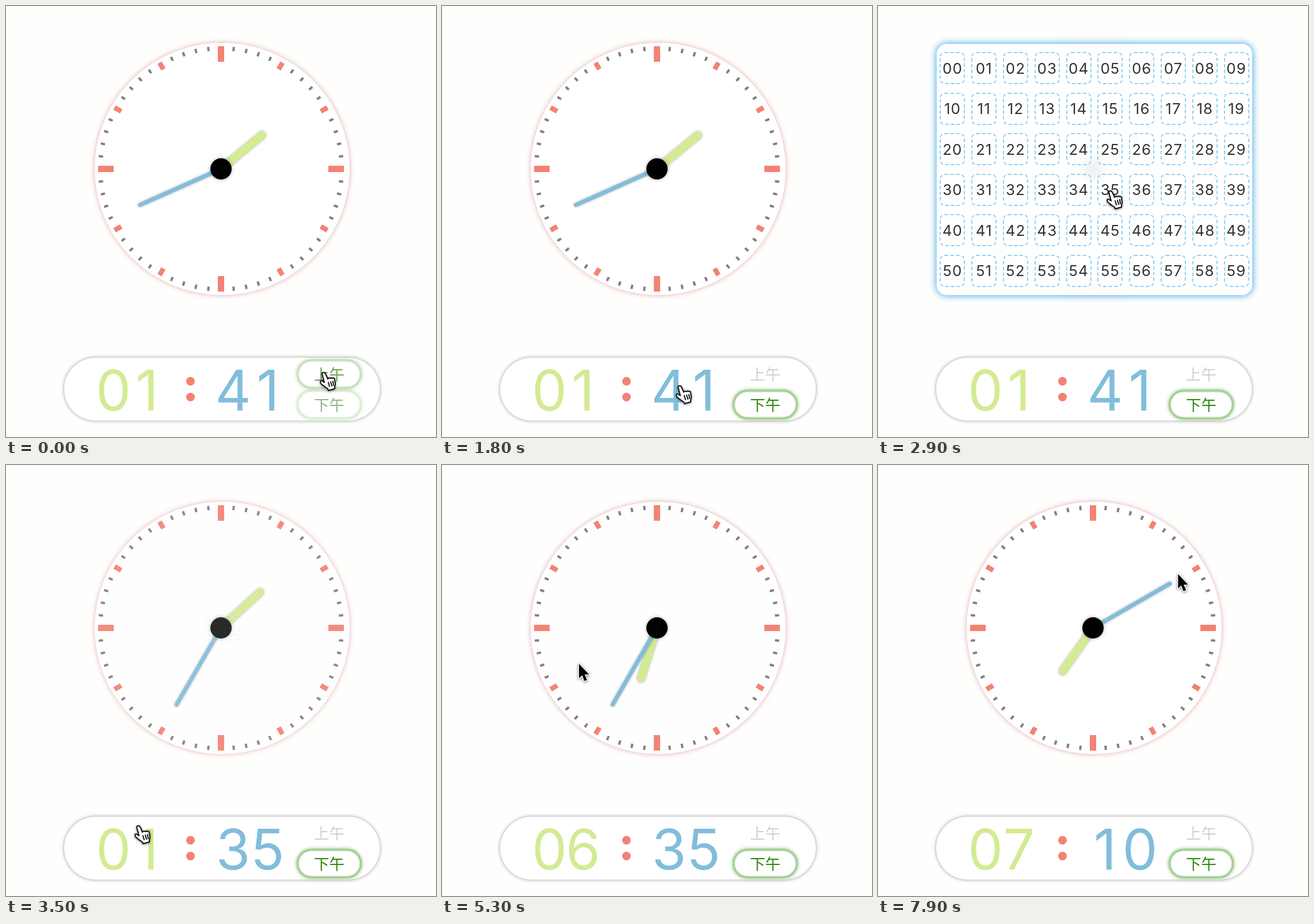
An HTML page for the animation above (8 s loop, 747 by 750 pixels).

```html
<!DOCTYPE html>
<html lang="zh">
<head>
<meta charset="utf-8">
<title>Clock picker</title>
<style>
html, body { margin: 0; width: 100%; height: 100%; overflow: hidden; background: #fefefd; }
svg { position: absolute; left: 0; top: 0; }
text { text-anchor: middle; }
.digit { font: 400 97px Inter, "Liberation Sans", sans-serif; }
.label { font: 400 26.5px "Noto Sans CJK SC", "Noto Sans CJK", sans-serif; }
.face { fill: #fff; filter: drop-shadow(0 0 4px #e0acac); }
.hand { stroke-linecap: round; filter: drop-shadow(0 0 2px #0005); }
.dot { filter: drop-shadow(0 0 3px #0005); }
.pill { fill: #fff; filter: drop-shadow(0 0 3px #9a9aa0); }
.glow { fill: #fff; stroke: #93c481; stroke-width: 2.5; filter: blur(1px) drop-shadow(0 0 3px #63a848); }
.grid {
  position: absolute; left: 101.5px; top: 65.5px; width: 548px; height: 437px;
  box-sizing: border-box; padding: 7px 0; display: grid; place-items: center;
  border-radius: 18px; background: #fffc;
  font: 26px Inter, "Liberation Sans", sans-serif; letter-spacing: 1px;
}
.grid span {
  box-sizing: border-box; width: 80%; height: 80%; display: grid; place-items: center;
  border: 2px dashed; border-radius: 9px;
}
.grid b { font-weight: 400; color: #333; }
#minutes { grid-template: repeat(6, 1fr) / repeat(10, 1fr); box-shadow: 0 0 12px 2px #5fb4ea; }
#minutes span { color: #8fcff8; }
#hours { grid-template: repeat(3, 1fr) / repeat(4, 1fr); box-shadow: 0 0 12px 2px #b9dc66; }
#hours span { color: #d3eb93; }
#pointer { filter: drop-shadow(0 1px 2px #0008); }
</style>
</head>
<body>
<svg width="747" height="750">
  <g id="clock">
    <ellipse class="face" cx="375.5" cy="283.5" rx="221.5" ry="219.5"/>
    <g transform="translate(373.5 283.5)">
      <g id="ticks"></g>
      <g class="hand"><path id="hourHand" d="M0 0V-92" stroke="#d3eb93" stroke-width="14"/></g>
      <g class="hand"><path id="minuteHand" d="M0 0V-154" stroke="#82bddb" stroke-width="7"/></g>
      <circle class="dot" r="18.5"/>
    </g>
  </g>
  <rect class="pill" x="101" y="612" width="548.5" height="109.5" rx="54.7"/>
  <g id="digits"></g>
  <g fill="#f38274"><circle cx="320.5" cy="653" r="7.5"/><circle cx="320.5" cy="680.5" r="7.5"/></g>
  <g id="am">
    <rect class="glow" x="507" y="617" width="109" height="47" rx="23.5"/>
    <text class="label" x="561.5" y="651">上午</text>
  </g>
  <g id="pm">
    <rect class="glow" x="507" y="670" width="109" height="47" rx="23.5"/>
    <text class="label" x="561.5" y="704">下午</text>
  </g>
</svg>
<div class="grid" id="minutes"></div>
<div class="grid" id="hours"></div>
<svg width="747" height="750">
  <g id="pointer" stroke-linejoin="round">
    <path id="arrow" d="M0 0V25L5.5 20 9.5 30 14 28 9.8 18.5H17.5Z" stroke="#fff" stroke-width="3" paint-order="stroke"/>
    <g id="finger" stroke="#111" stroke-width="2" stroke-linecap="round">
      <path fill="#fff" d="M-3 2Q-2-1 1 0Q3 1 4 4L7 11Q9 8 12 10Q14 8 16 10Q19 8 19 13Q21 20 19 24V28L8 31 7 28Q2 25-4 20Q-8 15-4 14L1 17Z"/>
      <path fill="none" d="M8 17L10 24M12 16L14 23M16 15L17 22"/>
    </g>
  </g>
</svg>
<script>
const $ = id => document.getElementById(id);
const pad = n => String(n).padStart(2, '0');
const clamp = x => Math.min(1, Math.max(0, x));
const LOOP = 8000, STEP = 100, CX = 373.5, CY = 283.5;

// Pointer stops: time, x, y
const path = [
  [0, 552, 638], [300, 602, 645], [450, 621, 662], [700, 590, 684], [1000, 586, 690],
  [1500, 391, 668], [1800, 413, 661], [2350, 413, 661], [2800, 404, 322], [3120, 404, 322],
  [3500, 230, 628], [3700, 226, 662], [3950, 226, 662], [4600, 306, 285], [4880, 306, 285],
  [5300, 238, 346], [5600, 271, 369], [6000, 299, 394], [6200, 302, 396], [6300, 302, 396]
];
// Dragging the minute hand: time, minute, radius
const drag = [
  [6300, 35.4, 133], [6900, 56.2, 157], [7200, 68.3, 188], [7500, 70.3, 190], [7800, 69.6, 175]
];
const slots = [186.5, 245, 394.5, 455];

for (let i = 0; i < 60; i++) {
  const [w, h, fill] = i % 15 == 0 ? [11, 27, '#f38274'] : i % 5 == 0 ? [8.5, 13.3, '#f38274'] : [4, 7.5, '#808080'];
  $('ticks').innerHTML += `<rect x="${-w / 2}" y="-213.5" width="${w}" height="${h}" fill="${fill}" transform="rotate(${i * 6})"/>`;
}
slots.forEach((x, i) =>
  $('digits').innerHTML += `<text class="digit" x="${x}" y="704" fill="${i < 2 ? '#d3eb93' : '#82bddb'}"></text>`);
const fillGrid = (id, first, count) => {
  for (let i = 0; i < count; i++) $(id).innerHTML += `<span><b>${pad(first + i)}</b></span>`;
};
fillGrid('minutes', 0, 60);
fillGrid('hours', 1, 12);

// cubic-bezier(.25, .1, .25, 1)
function ease(x) {
  x = clamp(x);
  let a = 0, b = 1, s = x;
  for (let i = 0; i < 20; i++) {
    s = (a + b) / 2;
    if (.75 * s * (1 - s) + s ** 3 < x) a = s; else b = s;
  }
  return .3 * s * (1 - s) ** 2 + 3 * s * s * (1 - s) + s ** 3;
}
// Rises after "on", falls after "off"
const toggle = (t, on, off) => t < off ? ease((t - on) / 500) : 1 - ease((t - off) / 500);

function tween(keys, t, curve) {
  const i = keys.findIndex(k => k[0] > t);
  if (i < 0) return keys[keys.length - 1].slice(1);
  const a = keys[i - 1], b = keys[i], p = curve((t - a[0]) / (b[0] - a[0]));
  return [1, 2].map(j => a[j] + (b[j] - a[j]) * p);
}

function showGrid(id, p) {
  const s = $(id).style;
  s.display = p > .001 ? 'grid' : 'none';
  s.opacity = p;
  s.transform = `scale(${p})`;
}

function showButton(id, p) {
  const [glow, label] = $(id).children;
  const mix = (a, b) => a + (b - a) * p;
  glow.style.opacity = p;
  label.setAttribute('fill', `rgb(${mix(208, 45)},${mix(208, 135)},${mix(208, 12)})`);
}

function render(t) {
  const am = toggle(t, -180, 750);
  showButton('am', am);
  showButton('pm', 1 - am);

  const minuteOpen = toggle(t, 2000, 3200), hourOpen = toggle(t, 3850, 4880);
  showGrid('minutes', minuteOpen);
  showGrid('hours', hourOpen);
  const open = Math.max(minuteOpen, hourOpen);
  $('clock').style.filter = open > .001 ? `blur(${open * 6}px)` : 'none';
  $('clock').style.opacity = 1 - open * .75;

  let x, y, minute = t < 3200 ? 41 : 35;
  if (t < 6300) [x, y] = tween(path, t, p => p * p * (3 - 2 * p));
  else {
    const [m, r] = tween(drag, t, p => p), angle = m * Math.PI / 30;
    x = CX + r * Math.sin(angle);
    y = CY - r * Math.cos(angle);
    minute = Math.round(m);
  }
  const total = (t < 4880 ? 1 : 6) * 60 + minute;
  $('hourHand').setAttribute('transform', `rotate(${total / 2})`);
  $('minuteHand').setAttribute('transform', `rotate(${total * 6})`);
  const shown = pad(Math.floor(total / 60)) + pad(total % 60);
  [...$('digits').children].forEach((d, i) => d.textContent = shown[i]);

  const pointing = y > 612 || open > .5 && y < 503;
  $('pointer').setAttribute('transform', `translate(${x} ${y})`);
  $('finger').style.display = pointing ? '' : 'none';
  $('arrow').style.display = pointing ? 'none' : '';
}

const start = performance.now();
function tick() {
  const t = (performance.now() - start) % LOOP;
  render(Math.floor(t / STEP) * STEP);
  requestAnimationFrame(tick);
}
tick();
</script>
</body>
</html>
```
